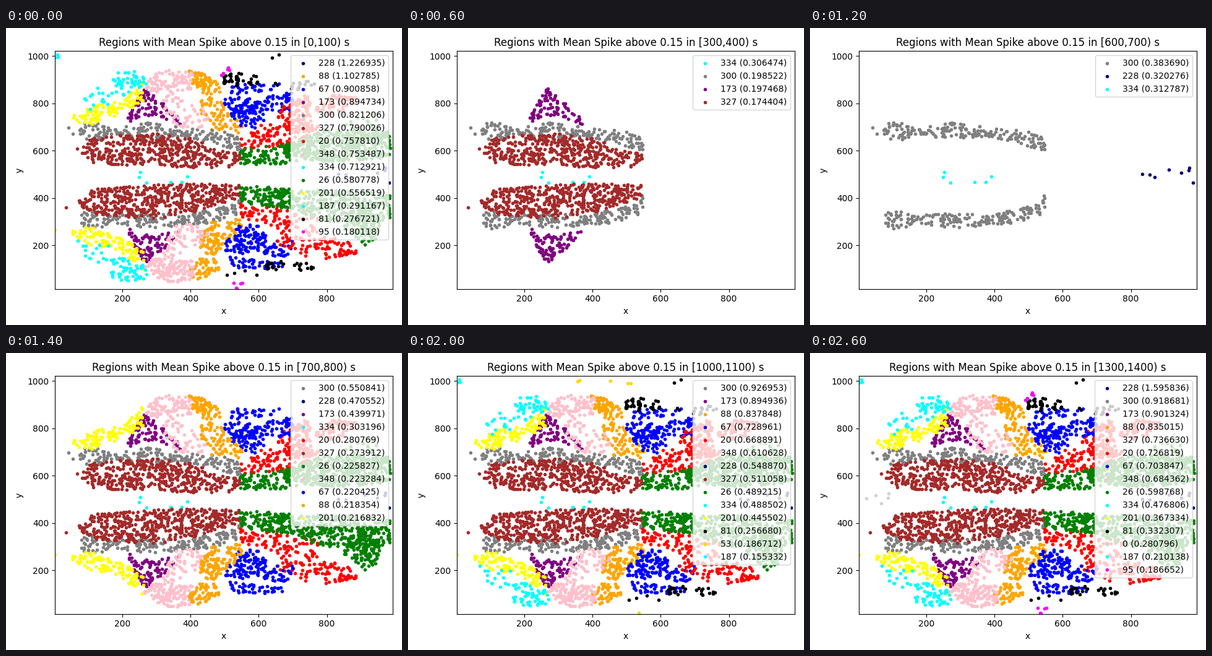
A matplotlib script that plays this animation: 640x480 px, repeating every 2.8 s.

```python
import numpy as np
import matplotlib.pyplot as plt
from matplotlib.animation import FuncAnimation

STEP = 200       # ms per time window
COUNT = 14       # windows in one loop
MIRROR = 990     # y of a point plus y of its mirror image
FAINT = 0.17     # level of a region that is only just above the threshold

rng = np.random.default_rng(12)
regions = {}
levels = {}


def strip(n, *knots):
    """Scatter n points evenly in a band given by (x, low, high) knots."""
    x, low, high = np.array(knots, float).T
    grid = np.linspace(x[0], x[-1], 300)
    area = np.cumsum(np.interp(grid, x, high - low))
    px = np.interp(rng.random(n), area / area[-1], grid)
    lo, hi = np.interp(px, x, low), np.interp(px, x, high)
    return np.column_stack([px, lo + (hi - lo) * rng.random(n)])


def pair(upper, lower, *knots):
    """The same band in the upper half and, mirrored, in the lower half."""
    below = strip(lower, *knots)
    below[:, 1] = MIRROR - below[:, 1]
    return np.vstack([strip(upper, *knots), below])


def dots(*points):
    return np.array(points, float)


def region(key, color, *parts):
    regions[key] = color, np.vstack(parts)


region("327", "brown", dots((35, 362)),
       pair(425, 480, (68, 605, 615), (115, 550, 655), (205, 538, 670),
            (300, 530, 674), (400, 530, 652), (545, 530, 585)))
region("300", "gray", dots((42, 697), (54, 672)),
       pair(185, 190, (75, 645, 720), (125, 645, 722), (165, 665, 695),
            (260, 655, 720), (400, 658, 702), (470, 630, 690),
            (530, 610, 670), (548, 570, 640)))
region("173", "purple",
       pair(84, 96, (215, 715, 755), (245, 735, 820), (268, 740, 868),
            (300, 745, 825), (325, 735, 800), (372, 710, 730)))
region("334", "cyan",
       dots((249, 490), (253, 509), (270, 464), (341, 467),
            (375, 467), (391, 491)))
region("228", "navy",
       dots((833, 501), (856, 498), (870, 488), (912, 519), (948, 506),
            (970, 517), (972, 527), (983, 464)))
region("20", "red",
       pair(72, 62, (545, 610, 668), (620, 615, 725), (695, 630, 705)),
       pair(150, 72, (655, 740, 790), (700, 655, 805), (740, 650, 840),
            (775, 665, 720)),
       pair(65, 58, (765, 775, 800), (800, 745, 848), (885, 785, 825)))
region("26", "green",
       pair(100, 135, (545, 545, 605), (600, 538, 620), (695, 550, 632)),
       pair(410, 330, (695, 555, 640), (740, 560, 660), (800, 555, 690),
            (900, 560, 690), (985, 575, 680)),
       pair(24, 125, (850, 670, 720), (910, 640, 788), (955, 660, 755)))
region("348", "pink",
       pair(92, 140, (265, 865, 890), (300, 840, 928), (350, 855, 950),
            (410, 850, 930)),
       pair(55, 62, (318, 780, 850), (350, 710, 850), (385, 695, 800),
            (450, 700, 775)))
region("67", "blue",
       pair(112, 112, (500, 780, 820), (540, 705, 830), (590, 685, 815),
            (620, 740, 800)),
       pair(30, 42, (515, 835, 885), (600, 850, 886), (670, 864, 884)),
       pair(45, 38, (612, 765, 825), (700, 770, 850)))
region("88", "orange",
       pair(72, 60, (395, 890, 940), (430, 840, 930), (485, 845, 890)),
       pair(74, 112, (428, 755, 815), (460, 690, 830), (500, 685, 800),
            (555, 665, 710)))
region("201", "yellow", dots((3, 266)),
       pair(105, 108, (52, 728, 755), (90, 712, 775), (130, 715, 800),
            (160, 740, 790), (200, 758, 825), (262, 805, 895)))
region("187", "cyan",
       strip(3, (3, 950, 1020), (18, 1000, 1020)),
       pair(14, 15, (50, 765, 780), (115, 775, 865), (160, 790, 870)),
       pair(48, 56, (165, 845, 930), (200, 830, 940), (272, 880, 935)))
region("81", "black", dots((640, 993), (659, 1006)),
       pair(34, 4, (495, 872, 915), (530, 875, 930), (600, 885, 915)),
       pair(2, 16, (620, 855, 890), (680, 850, 890)),
       pair(15, 12, (695, 855, 895), (762, 870, 900)))
region("53", "gold", dots((535, 22)),
       strip(5, (338, 1000, 1012), (550, 988, 998)))
region("0", "lightgray", strip(5, (9, 510, 525), (91, 468, 530)))
region("95", "magenta",
       strip(5, (465, 905, 915), (520, 935, 965)),
       pair(0, 5, (520, 930, 975), (575, 955, 975)))


def measured(i, text):
    levels[i] = {key: float(mean) for key, mean in
                 (item.split(":") for item in text.split())}


def between(i, a, b, keys):
    """Blend the levels of windows a and b for the given regions."""
    t = (i - a) / (b - a)
    blend = {k: (1 - t) * levels[a].get(k, FAINT) + t * levels[b].get(k, FAINT)
             for k in keys}
    levels[i] = dict(sorted(blend.items(), key=lambda kv: -kv[1]))


measured(0, "228:1.226935 88:1.102785 67:0.900858 173:0.894734 300:0.821206 "
            "327:0.790026 20:0.757810 348:0.753487 334:0.712921 26:0.580778 "
            "201:0.556519 187:0.291167 81:0.276721 95:0.180118")
measured(2, "228:0.502032 334:0.298521 300:0.189514 173:0.181868")
measured(5, "334:0.322379 173:0.228669 300:0.216539 327:0.183213")
measured(7, "300:0.550841 228:0.470552 173:0.439971 334:0.303196 20:0.280769 "
            "327:0.273912 26:0.225827 348:0.223284 67:0.220425 88:0.218354 "
            "201:0.216832")
measured(9, "300:0.831924 173:0.703184 228:0.635988 88:0.600970 348:0.585121 "
            "327:0.498311 20:0.477173 67:0.433981 201:0.378026 26:0.361197 "
            "334:0.255301")
measured(10, "300:0.926953 173:0.894936 88:0.837848 67:0.728961 20:0.668891 "
             "348:0.610628 228:0.548870 327:0.511058 26:0.489215 "
             "334:0.488502 201:0.445502 81:0.256680 53:0.186712 187:0.155332")
measured(13, "228:1.595836 300:0.918681 173:0.901324 88:0.835015 "
             "327:0.736630 20:0.726819 67:0.703847 348:0.684362 26:0.598768 "
             "334:0.476806 201:0.367334 81:0.332307 0:0.280796 187:0.210138 "
             "95:0.186652")
between(1, 0, 2, [*levels[0], "0", "53"])
between(3, 2, 5, levels[5])
between(4, 2, 5, [*levels[5], "20"])
between(6, 5, 7, ["334", "228", "300"])
between(8, 7, 9, [*levels[9], "0"])
between(11, 10, 13, [*levels[10], "95"])
between(12, 10, 13, levels[0])

fig, ax = plt.subplots(figsize=(6.4, 4.8), dpi=100)


def draw(i):
    ax.clear()
    for key, mean in levels[i].items():
        color, points = regions[key]
        ax.scatter(*points.T, marker=".", color=color,
                   label=f"{key} ({mean:.6f})")
    ax.set(xlim=(3, 993), ylim=(16.3, 1021.3), xlabel="x", ylabel="y")
    ax.set_title("Regions with Mean Spike above 0.15 in "
                 f"[{100 * i},{100 * (i + 1)}) s")
    ax.legend(loc="upper right")
    return []


draw(0)
fig.tight_layout()
anim = FuncAnimation(fig, draw, frames=COUNT, interval=STEP,
                     init_func=lambda: [], repeat=True, repeat_delay=0)
plt.show()
```
